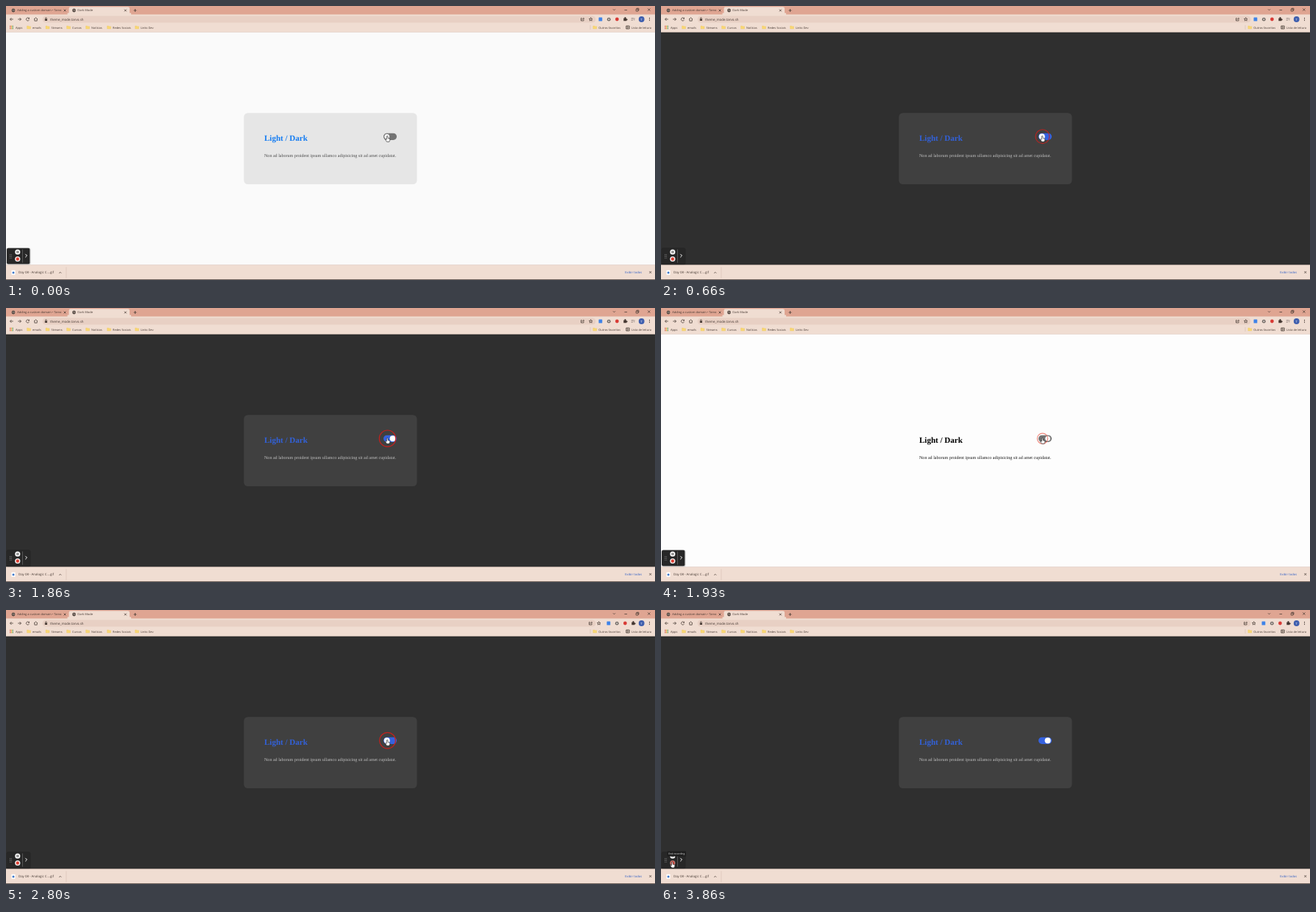
An HTML page for the animation above (3930 ms loop, 882x372 px).

```html
<!DOCTYPE html>
<html lang="pt">
<head>
<meta charset="utf-8">
<title>Light / Dark</title>
<style>
  html, body { margin: 0; width: 100%; height: 100%; overflow: hidden; }
  svg { display: block; width: 100vw; height: 100vh; text-rendering: geometricPrecision; }
  .ui { font-family: "Open Sans", "Noto Sans", sans-serif; }
  .serif { font-family: "Liberation Serif", "Times New Roman", serif; }
  .line { fill: none; stroke: #453832; stroke-width: .75; }
</style>
</head>
<body>
<svg id="stage" viewBox="0 0 882 372" preserveAspectRatio="none">
  <rect id="page" y="35" width="882" height="317"/>
  <rect id="card" x="323.3" y="145.2" width="235.2" height="96.8" rx="5.5"/>
  <text id="title" class="serif" x="351" y="182.7" font-size="11.03" font-weight="700">Light / Dark</text>
  <text id="body" class="serif" x="351" y="204.8" font-size="6.063">Non ad laborum proident ipsum ullamco adipisicing sit ad amet cupidatat.</text>
  <rect id="track" x="513" y="172.7" width="18" height="9.2" rx="4.6"/>
  <circle id="knob" cy="177.3" r="4" stroke-width=".8"/>
  <g id="browser" class="ui"></g>
  <g id="recorder"></g>
  <circle id="ring" cx="518.5" cy="177.2" fill="none" stroke-width="1.2"/>
  <g id="tooltip" class="ui">
    <rect x="8.5" y="327.5" width="25.5" height="7" rx="1" fill="#1e1e1e"/>
    <text x="10.3" y="332.2" font-size="3.4" fill="#eee">End recording</text>
  </g>
  <g id="cursor" fill="#fff" stroke="#111" stroke-width=".6" stroke-linejoin="round">
    <path id="hand" d="M-.9.6Q0-.6.8.6V3.2L3.4 4Q4 4.5 3.4 6.3L2.6 8H-.7L-2.8 4.9Q-2.3 3.9-.9 4.9Z"/>
    <path id="arrow" d="M0 0V6.2L1.5 4.9L2.5 7L3.4 6.6L2.5 4.6H4.4Z"/>
  </g>
</svg>
<script>
const $ = id => document.getElementById(id);
const LOOP = 3930;
const INK = '#453832', BAR = '#f0ddd2';

const rect = (x, y, w, h, fill, rx = 0) =>
  `<rect x="${x}" y="${y}" width="${w}" height="${h}" rx="${rx}" fill="${fill}"/>`;
const disc = (x, y, r, fill) => `<circle cx="${x}" cy="${y}" r="${r}" fill="${fill}"/>`;
const label = (x, y, text, size = 4, fill = INK) =>
  `<text x="${x}" y="${y}" font-size="${size}" fill="${fill}">${text}</text>`;
const line = (x, y, d, extra = '') =>
  `<path class="line" transform="translate(${x} ${y})" d="${d}" ${extra}/>`;
const cross = (x, y, r = 1.4) => line(x, y, `M${-r} ${-r}L${r} ${r}M${r} ${-r}L${-r} ${r}`);
const globe = (x, y) => disc(x, y, 2.4, '#514741') +
  line(x, y, 'M-1.5-.8L-.2-.5L-.5.8M.5-1.4L1.5-.3L.6 1', 'style="stroke:#dcc7bc;stroke-width:.5"');
const folder = x => `<path transform="translate(${x} 29)" fill="#f8d775" stroke="#e9c35e" stroke-width=".3" d="M-2.5-2H-.5L.2-1.3H2.5V2H-2.5Z"/>`;

function tabs() {
  return rect(0, 0, 882, 12, '#dfa592') +
    rect(85.5, 1.3, 82.5, 11, BAR, 2.3) + rect(83.5, 9.5, 86.5, 3, BAR) +
    globe(10, 6) + label(15.2, 7.3, 'Adding a custom domain • Tarvo') + cross(80, 6) +
    globe(92.5, 6) + label(97.3, 7.3, 'Dark Mode') + cross(162.3, 6) +
    line(175.5, 6, 'M-2 0H2M0-2V2') +
    line(826.5, 5, 'M-1.5-.7L0 .8L1.5-.7') + line(842.3, 5.5, 'M-1.8 0H1.8') +
    line(858, 5, 'M-1.8-.8H1V2H-1.8ZM-.9-.8V-1.8H1.9V1H1') + cross(873.8, 5, 1.6);
}

function toolbar() {
  return rect(0, 11.5, 882, 24, BAR) +
    rect(49.5, 13.4, 752, 9.2, '#e8d0c4', 4.6) +
    line(7.5, 18, 'M2.3 0H-2M0-2L-2 0L0 2') +
    line(18.5, 18, 'M-2.3 0H2M0-2L2 0L0 2') +
    line(29.5, 18, 'M1.7-1.3A2.1 2.1 0 1 0 2 .8M2-2.3V-.7H.4') +
    line(40.5, 18, 'M-2.5 0L0-2.2L2.5 0M-1.7-.5V2.2H1.7V-.5') +
    rect(52.8, 17.4, 3.2, 2.6, INK, .3) + line(54.4, 17.4, 'M-.9 0V-.7A.9.9 0 0 1 .9-.7V0') +
    label(60, 19.6, 'theme_mode.tarvo.sh', 4.47) +
    '<g id="sliding">' +
      line(783.5, 18, 'M-.8-1.5H-2V2H1.6V.5M-.8.8Q-.5-1 2-1M1-2L2.1-1L1 0') +
      line(794.7, 18, 'M0-2.3L.7-.7L2.3-.6L1.1.5L1.5 2.1L0 1.2L-1.5 2.1L-1.1.5L-2.3-.6L-.7-.7Z') +
      rect(805.5, 15.6, 4.8, 4.8, '#3f83e8', .5) +
      disc(819.3, 18.2, 2.4, '#6f6863') + disc(819.3, 18.2, 1.1, '#d8cdc7') +
      disc(830.4, 18, 2.4, '#d83a35') +
      `<path fill="${INK}" transform="translate(841.5 18)" d="M-2.2-1.6H-.8A.9.9 0 1 1 .8-1.6H1.8V-.3A.9.9 0 1 1 1.8 1.2V2.3H-2.2Z"/>` +
    '</g>' +
    `<g id="media">${line(852, 18, 'M-2.3-1.5H1M-2.3 0H.6M-2.3 1.5H-.2M1.8 1.6V-1.3H2.6', 'style="stroke:#988a83"')}</g>` +
    disc(863.7, 18, 3.9, '#3f5fae') + label(862.6, 19.5, 'T', 4.1, '#fff') +
    [-1.6, 0, 1.6].map(dy => disc(874.5, 18 + dy, .55, INK)).join('');
}

function bookmarks() {
  const apps = ['#d95343', '#e9ad2b', '#4d9d5c'];
  let out = '';
  for (let i = 0; i < 9; i++)
    out += rect(5.2 + i % 3 * 1.7, 26.7 + Math.floor(i / 3) * 1.7, 1.2, 1.2, apps[i % 3]);
  out += label(13, 30.5, 'Apps');
  const items = [[36, 'emails'], [61.5, 'Streams'], [90, 'Cursos'], [116, 'Notícias'],
    [145, 'Redes Sociais'], [183, 'Links Dev'], [805.3, 'Outros favoritos']];
  for (const [x, name] of items) out += folder(x - 5) + label(x, 30.5, name, 3.95);
  return out + line(794, 29, 'M0-3V3', 'style="stroke:#cdb6aa;stroke-width:.5"') +
    line(845, 29, 'M-2.2-2H2.2V2H-2.2ZM-.8-2V2M.3-.8H1.5M.3.6H1.5') +
    label(850, 30.5, 'Lista de leitura', 3.95) + rect(0, 35.2, 882, .5, '#dac5ba');
}

function downloads() {
  return rect(0, 351.6, 882, 20.4, BAR) + rect(0, 351.5, 882, .5, '#d4bfb4') +
    rect(7.5, 358.8, 5, 6.2, '#fff', .4) + disc(10, 362, 1.5, '#3d78ca') +
    label(17, 363.4, 'Day 08 - Analogic C....gif', 4.35) +
    line(73.7, 362, 'M-1.5.8L0-.7L1.5.8') +
    rect(81.7, 354.5, .5, 15, '#cfb9ad') +
    label(841.3, 363.2, 'Exibir todos', 4.15, '#315fc4') + cross(875.7, 361.5) +
    rect(0, 371.2, 882, .8, '#4a3f3b');
}

function recorder() {
  let dots = '';
  for (let i = 0; i < 8; i++)
    dots += disc(5.5 + i % 2 * 1.7, 337.2 + Math.floor(i / 2) * 1.8, .45, '#bbb');
  return rect(.5, 328.3, 33, 23, '#0003', 2.5) + rect(1, 328.8, 31.3, 21.4, '#272727', 2) + dots +
    disc(15.8, 334, 3.6, '#f4f4f4') + rect(14.5, 332.6, .9, 2.8, '#333') + rect(16.2, 332.6, .9, 2.8, '#333') +
    '<circle id="stopRim" cx="15.8" cy="343.5" r="3.6"/>' + disc(15.8, 343.5, 2.2, '#dc4034') +
    rect(22, 330.5, .6, 18, '#777') +
    line(27.4, 339, 'M-1.1-2.2L1.1 0L-1.1 2.2', 'style="stroke:#fff;stroke-width:1"');
}

$('browser').innerHTML = tabs() + toolbar() + bookmarks() + downloads();
$('recorder').innerHTML = recorder();

const themes = {
  initial: { page: '#fafafa', card: '#e6e6e6', title: '#147cf2', body: '#4a4a4a', track: '#737373', knob: '#fafafa', rim: '#555' },
  dark: { page: '#2f2f2f', card: '#404040', title: '#3261d9', body: '#c2c2c2', track: '#3562df', knob: '#fff', rim: 'none' },
  light: { page: '#fdfdfd', card: 'none', title: '#000', body: '#151515', track: '#737373', knob: '#fdfdfd', rim: '#555' }
};
// Each click swaps the theme shortly after the button is let go.
const clicks = [
  { at: 660, release: 630, theme: 'dark', on: 1 },
  { at: 1930, release: 1860, theme: 'light', on: 0 },
  { at: 2800, release: 2795, theme: 'dark', on: 1 }
];
const pointer = [[0, 518.2, 176.3], [2930, 518.2, 176.3], [3200, 75, 361], [3290, 55, 360], [3530, 15.3, 342]];

const clamp = v => Math.min(1, Math.max(0, v));
const smooth = v => v * v * (3 - 2 * v);

// The CSS "ease" curve, solved for its parameter by bisection.
function ease(x) {
  const bezier = (a, b, s) => 3 * a * s * (1 - s) ** 2 + 3 * b * s * s * (1 - s) + s ** 3;
  let lo = 0, hi = 1;
  for (let i = 0; i < 20; i++) {
    const mid = (lo + hi) / 2;
    if (bezier(.25, .25, mid) < x) lo = mid; else hi = mid;
  }
  return bezier(.1, 1, lo);
}

function pointerAt(t) {
  const i = pointer.findIndex(p => p[0] > t);
  if (i < 0) return pointer[pointer.length - 1].slice(1);
  const [t0, x0, y0] = pointer[i - 1], [t1, x1, y1] = pointer[i];
  const k = smooth((t - t0) / (t1 - t0));
  return [x0 + (x1 - x0) * k, y0 + (y1 - y0) * k];
}

function set(id, attrs) {
  for (const name in attrs) $(id).setAttribute(name, attrs[name]);
}
const show = (id, visible) => set(id, { visibility: visible ? 'visible' : 'hidden' });

function drawRing(t, dark) {
  const click = clicks.find(c => t >= c.release - 200 && t < c.release + 190);
  show('ring', click);
  if (!click) return;
  const age = t - click.release;
  const r = age < 0 ? 11.2 * clamp((age + 200) / 100) : 11.2 - age * .058;
  set('ring', { r: Math.max(0, r), stroke: dark ? '#c9201c' : '#e8594a', opacity: age < 0 ? .95 : .95 - age * .0035 });
}

function draw(t) {
  const click = clicks.filter(c => c.at <= t).pop();
  const name = click ? click.theme : 'initial';
  const theme = themes[name];
  for (const id of ['page', 'card', 'title', 'body', 'track', 'knob']) set(id, { fill: theme[id] });
  const k = click ? ease(clamp((t - click.at) / 400)) : 0;
  const slide = click ? (click.on ? k : 1 - k) : 0;
  set('knob', { cx: 517.7 + 7.9 * slide, stroke: theme.rim });
  drawRing(t, name === 'dark');

  const compact = t >= 2400;
  show('media', !compact);
  set('sliding', { transform: `translate(${compact ? 11 : 0} 0)` });

  const [x, y] = pointerAt(t);
  const moving = t > 2960 && t < 3490;
  set('cursor', { transform: `translate(${x} ${y})` });
  show('hand', !moving);
  show('arrow', moving);
  show('tooltip', t >= 3600);
  set('stopRim', { fill: t >= 3490 ? '#b9756f' : '#f4f4f4' });
}

function held(t) {
  const step = Math.floor((Math.floor(t / 10) * 10 + 9.9) * 3 / 200);
  return Math.floor(step * 20 / 3) * 10;
}

const start = performance.now();
function tick() {
  draw(held((performance.now() - start) % LOOP));
  requestAnimationFrame(tick);
}
tick();
</script>
</body>
</html>
```
